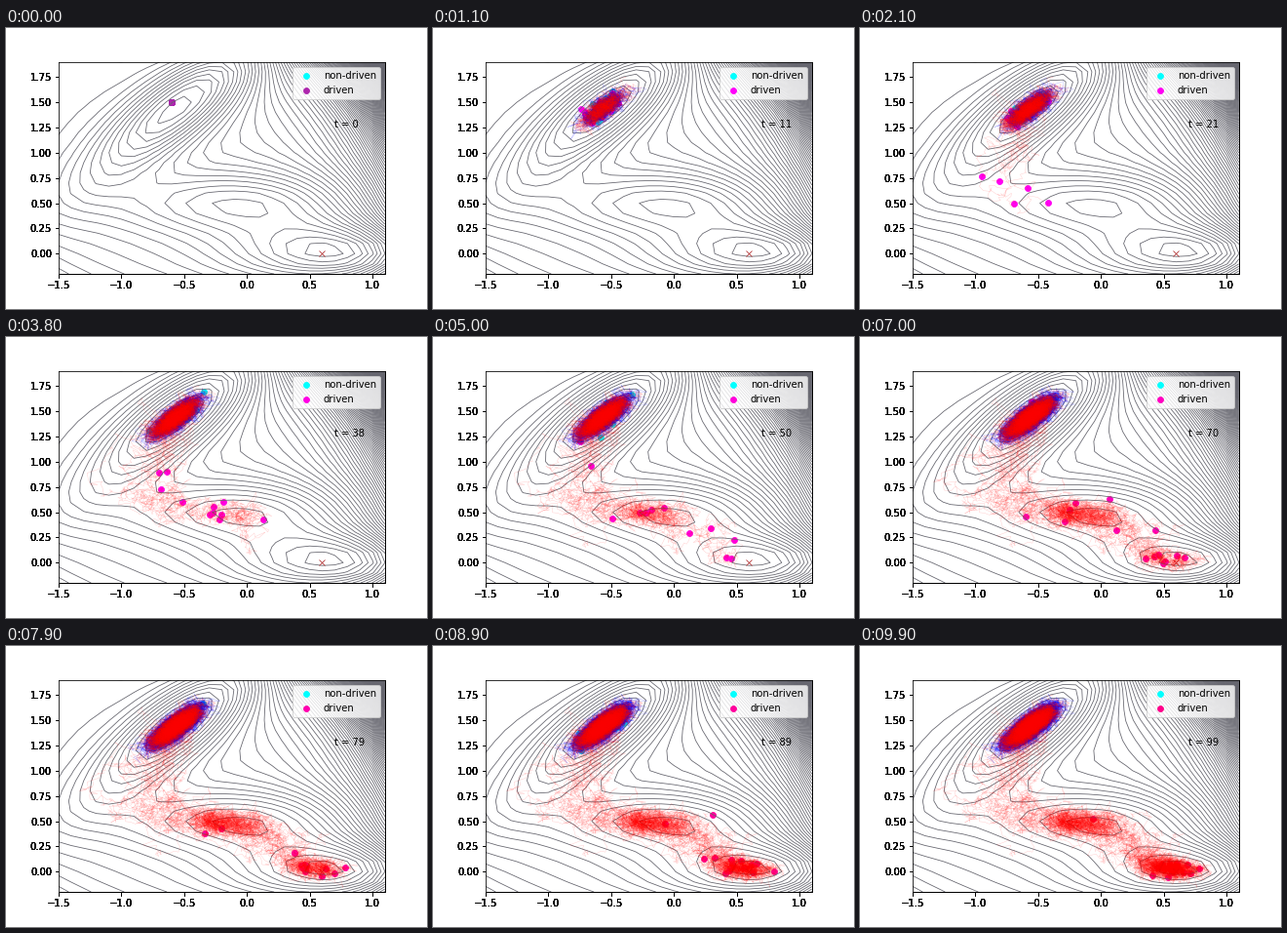
A matplotlib script that plays this animation: 432x288 px, repeating every 10 s.

```python
import numpy as np
import matplotlib.pyplot as plt
from matplotlib.animation import FuncAnimation
from matplotlib.collections import LineCollection

FRAMES, SUB, COUNT = 100, 12, 20
DT, KT = 1e-4, 6.0
TOW, HOLD = 270.0, 60.0
START, MIDDLE, EXIT = (-0.6, 1.5), (-0.15, 0.47), (0.6, 0.0)
XLIM, YLIM = (-1.5, 1.1), (-0.2, 1.9)

# Mueller-Brown surface
AMP = np.array([-200, -100, -170, 15])
QA = np.array([-1, -1, -6.5, 0.7])
QB = np.array([0, 0, 11, 0.6])
QC = np.array([-10, -10, -6.5, 0.7])
CX = np.array([1, 0, -0.5, -1])
CY = np.array([0, 0.5, 1.5, 1])


def terms(x, y):
    dx, dy = x[..., None] - CX, y[..., None] - CY
    return dx, dy, AMP * np.exp(QA * dx**2 + QB * dx * dy + QC * dy**2)


def potential(x, y):
    return terms(x, y)[2].sum(-1)


def force(p):
    dx, dy, e = terms(p[:, 0], p[:, 1])
    fx = -(e * (2 * QA * dx + QB * dy)).sum(-1)
    fy = -(e * (QB * dx + 2 * QC * dy)).sum(-1)
    return np.stack([fx, fy], axis=1)


# Times at which walkers are pulled out of the first and second basin
leave, hop = np.full((2, COUNT), 1e3)
leave[:14] = np.interp(np.arange(14), [0, 4, 7, 10, 13], [9, 15, 26, 33, 55])
hop[:11] = np.interp(np.arange(11), [0, 2, 3, 7, 10], [42, 47, 64, 75, 93])


def pull(p, t):
    """Tow walkers between basins and hold them in the middle one."""
    f = force(p)
    age = t - leave
    stops = [0, 3, 6, 9, 12]
    anchor = np.stack([np.interp(age, stops, [-0.6, -0.77, -1.03, -0.67, -0.15]),
                       np.interp(age, stops, [1.2, 0.87, 0.58, 0.41, 0.47])], axis=1)
    out = (age > 0) & (age < 12)
    f[out] = TOW * (anchor - p)[out]
    held = (age >= 12) & (t <= hop)
    f[held] += HOLD * (MIDDLE - p)[held]
    over = (t > hop) & (t < hop + 5)
    f[over] = TOW * (EXIT - p)[over]
    return f


def walk(drift, seed):
    rng = np.random.default_rng(seed)
    p = np.tile(START, (COUNT, 1))
    path = [p]
    for step in range((FRAMES - 1) * SUB):
        noise = rng.normal(0, np.sqrt(2 * KT * DT), p.shape)
        p = p + drift(p, step / SUB) * DT + noise
        path.append(p)
    return np.array(path)


def pieces(path):
    """One short polyline per walker and frame, in order of time."""
    return [path[k * SUB:(k + 1) * SUB + 1, i]
            for k in range(FRAMES - 1) for i in range(COUNT)]


free = walk(lambda p, t: force(p), 3)
driven = walk(pull, 8)
free_bits, driven_bits = pieces(free), pieces(driven)

plt.rcParams.update({"font.family": "DejaVu Sans", "font.size": 10})
fig = plt.figure(figsize=(6, 4), dpi=72, facecolor="white")
BOX = [0.125, 0.125, 0.775, 0.755]


def add_axes(z):
    a = fig.add_axes(BOX, zorder=z)
    a.set(xlim=XLIM, ylim=YLIM)
    return a


# Stacked copies give the heavy tick labels
for z in range(5):
    add_axes(z)
ax = add_axes(6)

xs, ys = np.meshgrid(np.linspace(*XLIM, 27), np.linspace(*YLIM, 22))
ax.contour(xs, ys, potential(xs, ys), levels=np.arange(-137.5, 1801, 12.5),
           colors="#66666f", linewidths=0.8, linestyles="solid")
ax.plot(*EXIT, "x", color="#b03030", markersize=6, markeredgewidth=0.8)
ax.set(xlim=XLIM, ylim=YLIM)

free_dots = ax.scatter(*free[0].T, s=36, color="cyan", linewidths=0.8,
                       label="non-driven")
driven_dots = ax.scatter(*driven[0].T, s=36, color="magenta", linewidths=0.8,
                         label="driven")
free_trail = LineCollection([], colors="blue", linewidths=0.5, alpha=0.25, zorder=2)
driven_trail = LineCollection([], colors="red", linewidths=0.5, alpha=0.18, zorder=2)
for trail in (free_trail, driven_trail):
    ax.add_collection(trail, autolim=False)
clock = ax.text(0.7, 1.25, "t = 0")
legend = ax.legend(loc="upper right")


def dot_color(t):
    keys = [0, 5, 61, 99]
    return (np.interp(t, keys, [0.68, 1, 1, 1]),
            np.interp(t, keys, [0.15, 0, 0, 0]),
            np.interp(t, keys, [0.68, 1, 0.82, 0.54]))


def update(t):
    free_dots.set_offsets(free[t * SUB])
    driven_dots.set_offsets(driven[t * SUB])
    for dots in (driven_dots, legend.legend_handles[1]):
        dots.set_color(dot_color(t))
    free_trail.set_segments(free_bits[:t * COUNT])
    driven_trail.set_segments(driven_bits[:t * COUNT])
    clock.set_text(f"t = {t}")
    return free_dots, driven_dots, free_trail, driven_trail, clock


anim = FuncAnimation(fig, update, frames=FRAMES, interval=100, repeat=True,
                     repeat_delay=0, blit=False)
plt.show()
```
